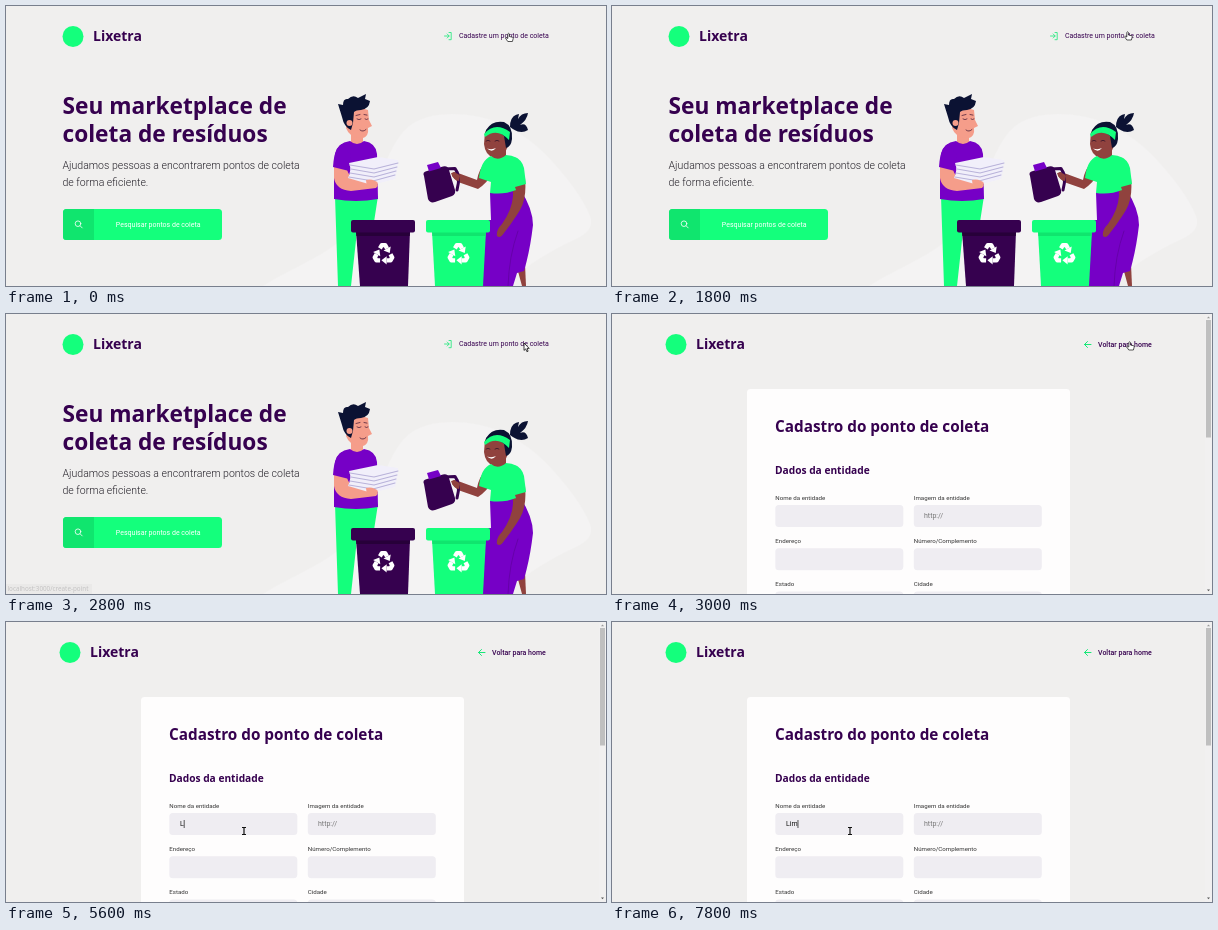
Write an HTML page that moves like this. It is 600 px wide and 280 px high and loops after 8000 ms.

```html
<!DOCTYPE html>
<html lang="pt-BR">
<head>
<meta charset="utf-8">
<title>Ponto de coleta</title>
<style>
  html, body { margin: 0; width: 100%; height: 100%; overflow: hidden; background: #f0efee; }
  svg { display: block; width: 100%; height: 100%; font: 7px Roboto, sans-serif; }
  .title { font-family: "Noto Sans", sans-serif; font-weight: 700; fill: #36014f; }
  .brand { font-size: 14px; }
  .lead { font-size: 10.54px; font-weight: 300; fill: #25222a; }
  .link { fill: #36014f; }
  .label { font-size: 6.15px; fill: #333; }
  .status { font: 6.3px "Noto Sans", sans-serif; fill: #c4c3c3; }
  .field { fill: #efedf2; }
  .line { fill: none; stroke-linecap: round; stroke-linejoin: round; }
  .skin { fill: #f59d8a; }
  .brown { fill: #90423e; }
  .hair { fill: #0b1233; }
  .violet { fill: #7600c6; }
  .plum { fill: #36014f; }
  .green { fill: #14ff7c; }
  .shade { fill: #10e56e; }
</style>
</head>
<body>
<svg viewBox="0 0 600 280">
  <defs>
    <g id="bend">
      <path d="M-3-5L-1.4-7.6H1.4L3-4.8" fill="none" stroke="#fff" stroke-width="3.6" stroke-linejoin="round"/>
      <path d="M6-6.5L0-3.1 5.2-1z" fill="#fff"/>
    </g>
    <g id="recycle">
      <use href="#bend"/>
      <use href="#bend" transform="rotate(120)"/>
      <use href="#bend" transform="rotate(240)"/>
    </g>
  </defs>
  <rect width="600" height="280" fill="#f0efee"/>

  <g id="home">
    <path d="M257 280C285 262 325 248 346 224C372 192 378 142 402 121C420 106 450 106 474 111C502 117 526 134 543 152C560 170 577 192 584 210C588 221 581 227 572 232C545 245 520 258 500 280z" fill="#f4f3f3"/>
    <circle class="green" cx="67" cy="30.5" r="10.5"/>
    <text class="title brand" x="87" y="35.3">Lixetra</text>
    <g class="line" stroke="#18e878" stroke-width=".8">
      <path d="M443 26.5h2.2v7.2H443M438.5 30h4.5M441.2 28l2 2-2 2"/>
    </g>
    <text class="link" x="453" y="32.2">Cadastre um ponto de coleta</text>
    <g class="title" font-size="22.7">
      <text x="56.5" y="108">Seu marketplace de</text>
      <text x="56.5" y="135.6">coleta de resíduos</text>
    </g>
    <text class="lead" x="56.5" y="163">Ajudamos pessoas a encontrarem pontos de coleta</text>
    <text class="lead" x="56.5" y="179.7">de forma eficiente.</text>
    <rect class="green" x="57" y="203" width="159" height="31" rx="3.5"/>
    <path class="shade" d="M88 203H60.5a3.5 3.5 0 0 0-3.5 3.5v24a3.5 3.5 0 0 0 3.5 3.5H88z"/>
    <g class="line" stroke="#fff" stroke-width=".8">
      <circle cx="72" cy="217.7" r="2.8"/><path d="M74.2 219.9l2 2"/>
    </g>
    <text x="152.2" y="220.8" text-anchor="middle" fill="#fff">Pesquisar pontos de coleta</text>

    <g id="man">
      <path class="green" d="M329 190H372L368 216H352L345 280H332z"/>
      <path class="skin" d="M345 122H357V137Q352 142 345 138z"/>
      <path class="skin" d="M340 104Q352 100 362 104L363 114 366 120 362 122Q363 130 357 132Q344 133 340 122z"/>
      <path class="hair" d="M347 117L345 124Q338 121 336 111L332 98L337 99Q337 92 342 93Q347 88 352 92L360 88L359 93L364 95Q363 103 355 104Q350 104 348 106z"/>
      <circle class="skin" cx="343.5" cy="117" r="3"/>
      <path class="line" stroke="#3a1230" stroke-width=".7" d="M351 113q2 1.5 4 0M359 113q1.5 1.2 3 0M354 124q3 2.5 6-.5M350 109.5l4-1M358 108.5l3 .6"/>
      <path class="violet" d="M344 135Q351 141 358 135Q370 137 371 148L372 193Q350 197 328 193V162L329 148Q331 137 344 135z"/>
      <path class="skin" d="M328 160L341 163Q342 170 349 173L367 173Q375 177 370 182L345 185Q330 184 328 172z"/>
      <path class="violet" d="M336 138Q328 142 327 161L343 165L345 149z"/>
      <path d="M343 157L372 151L392 154Q392 162 389 173L366 179L342 172Q346 164 343 157z" fill="#f1effa"/>
      <path class="line" stroke="#b9b3da" stroke-width="1.1" d="M344 159L368 163L392 157M345 163L368 167L391 161M344 167L368 171L390 165M343 171L367 175L389 169"/>
      <path class="skin" d="M360 174Q367 172 372 177Q370 182 361 182z"/>
    </g>

    <g id="jug">
      <path class="brown" d="M479 157Q473 163 471 174L452 167Q445 164 446 170L452 176L472 183Q481 177 486 168z"/>
      <path class="line" stroke="#36014f" stroke-width="3" d="M438 163L449 162.5Q455 170 451 184"/>
      <path class="plum" d="M418 170Q416 166 421 165L437 160.5Q442 159.5 443 164L449 184Q450 188 446 190L429 196Q424 197.5 422 193z"/>
      <path class="violet" d="M421 159L432 156L435 162L423 165.5z"/>
      <path class="brown" d="M445 167q6-1 9 3l-1 5q-6-1-8-8z"/>
    </g>

    <g id="woman">
      <path class="brown" d="M510 258H519L520 280H516z"/>
      <path class="violet" d="M484 187L514 183Q527 203 527 219Q524 245 518 265L511 267L507 280H477V214H485z"/>
      <path class="line" stroke="#6200a3" stroke-width=".8" d="M512 225Q503 250 502 280"/>
      <path class="brown" d="M487 141H500V153Q492 158 486 152z"/>
      <path class="brown" d="M479 126Q488 117 501 124L502 140Q498 152 488 152Q479 149 478 138z"/>
      <path class="hair" d="M480 124Q486 114 498 116Q507 120 506 133Q505 141 500 142L498 130Q489 122 479 130z"/>
      <path class="hair" d="M504 121Q504 109 513 108L512 113Q515 107 522 107Q521 114 514 119Q520 116 522 124Q514 129 504 121z"/>
      <path class="green" d="M478 128Q489 115 504 126L503 134Q491 121 479 131z"/>
      <path class="line" stroke="#280d26" stroke-width=".7" d="M480 135q2-1.6 4 0M489 135q2-1.6 4 0"/>
      <path fill="#fff" d="M481 142.5q5 1.5 9-.5q-4 5-9 .5z"/>
      <path class="brown" d="M507 174L519 172Q521 192 514 204Q506 217 498 227Q494 233 491 230Q490 224 496 218Q506 204 507 190z"/>
      <path class="green" d="M485 150Q492 156 500 149Q515 150 518 162L520 178L509 181L510 184Q498 189 484 187L485 176L473 172Q475 154 485 150z"/>
    </g>

    <g id="bins">
      <path class="plum" d="M350 225H404L402 280H354z"/>
      <path fill="#270039" d="M350 226H404L403.7 230H350.4z"/>
      <rect class="plum" x="345" y="214" width="64" height="12.5" rx="2"/>
      <path class="green" d="M426 225H480L477 280H429z"/>
      <path class="shade" d="M426 226H480L479.7 230H426.4z"/>
      <rect class="green" x="420" y="214" width="64" height="12.5" rx="2"/>
      <use href="#recycle" transform="translate(377.5 248.3) scale(1.2)"/>
      <use href="#recycle" transform="translate(452.5 248.3) scale(1.2)"/>
    </g>
    <g id="status">
      <rect y="270" width="86" height="10" fill="#eae9e8"/>
      <text class="status" x="1.5" y="277.3">localhost:3000/create-point</text>
    </g>
  </g>

  <g id="form">
    <circle class="green" cx="64" cy="30.5" r="10.5"/>
    <text class="title brand" x="84" y="35.3">Lixetra</text>
    <path class="line" stroke="#18e878" stroke-width="1" d="M479 30.5h-6.5M475.5 27.5l-3 3 3 3"/>
    <text class="link" x="486" y="32.6" font-weight="500">Voltar para home</text>
    <rect x="135" y="75" width="323" height="220" rx="3.5" fill="#fefdfd"/>
    <text class="title" x="163" y="118.3" font-size="15.3">Cadastro do ponto de coleta</text>
    <text class="title" x="163" y="160" font-size="10.2">Dados da entidade</text>
    <g id="fields"></g>
    <text x="312" y="204.2" fill="#777">http://</text>
    <text id="typed" x="174" y="204.2" fill="#151515"></text>
    <rect id="caret" y="198" width=".7" height="8" fill="#111"/>
    <rect x="593" width="7" height="280" fill="#f1f0f0"/>
    <rect x="594" y="6" width="5" height="117.5" fill="#bfbfbf"/>
    <path d="M595 4.3h3l-1.5-1.8z" fill="#999"/>
    <path d="M595 275.5h3l-1.5 1.8z" fill="#555"/>
  </g>

  <g id="cursor" stroke-linejoin="round">
    <path id="hand" d="M-1.2 1V-3.6Q-.4-4.8.4-3.6V-1L3.8-.2Q4.4 0 4.2 1L3.4 4H-1.2L-3.4.8Q-3.2-.4-1.2 1z" fill="#fff" stroke="#111" stroke-width=".7"/>
    <path id="arrow" d="M0 0V7.4L1.7 5.9 2.9 8.7 4.1 8.2 3 5.4H5.2z" fill="#fff" stroke="#111" stroke-width=".8"/>
    <path id="beam" d="M-2-3.5H2M0-3.5V3.5M-2 3.5H2" fill="none" stroke="#111" stroke-width="1.2"/>
  </g>
</svg>
<script>
const LOOP = 8000, FORM_AT = 3000, FOCUS_AT = 3600, BLINK = 600;
const $ = id => document.getElementById(id);
const show = (id, on) => $(id).style.display = on ? '' : 'none';
const latest = (steps, t) => steps.findLast(step => step[0] <= t);

const pointer = [
  [0, 'hand', 503, 31.5], [1400, 'hand', 501, 33.5], [1600, 'hand', 516, 30],
  [2200, 'hand', 534, 26], [2400, 'hand', 521.5, 30], [2600, 'arrow', 519, 29],
  [2800, 'arrow', 518, 29], [3000, 'hand', 518, 32], [3200, 'arrow', 340, 139],
  [3400, 'beam', 238, 209]
];
const typing = [[0, ''], [5600, 'L'], [7600, 'Li'], [7800, 'Lim']];

const labels = ['Nome da entidade', 'Imagem da entidade', 'Endereço', 'Número/Complemento', 'Estado', 'Cidade'];
$('fields').innerHTML = labels.map((label, i) => {
  const x = 163.3 + i % 2 * 138.5, y = 191 + Math.floor(i / 2) * 43.2;
  return `<text class="label" x="${x}" y="${y - 5}">${label}</text>
    <rect class="field" x="${x}" y="${y}" width="128" height="22" rx="3.5"/>`;
}).join('');

function draw(t) {
  show('home', t < FORM_AT);
  show('form', t >= FORM_AT);
  show('status', t >= 2600);

  const [, shape, x, y] = latest(pointer, t);
  for (const id of ['hand', 'arrow', 'beam']) show(id, id === shape);
  $('cursor').setAttribute('transform', `translate(${x} ${y})`);

  // Each keystroke restarts the caret's blink.
  const [typedAt, text] = latest(typing, t);
  $('typed').textContent = text;
  const since = t - Math.max(typedAt, FOCUS_AT);
  const caretOn = since >= 0 && Math.floor(since / BLINK) % 2 === 0;
  show('caret', caretOn);
  if (caretOn) $('caret').setAttribute('x', 174 + (text ? $('typed').getComputedTextLength() : 0));
}

const start = performance.now();
function tick() {
  draw((performance.now() - start) % LOOP);
  requestAnimationFrame(tick);
}
tick();
</script>
</body>
</html>
```
